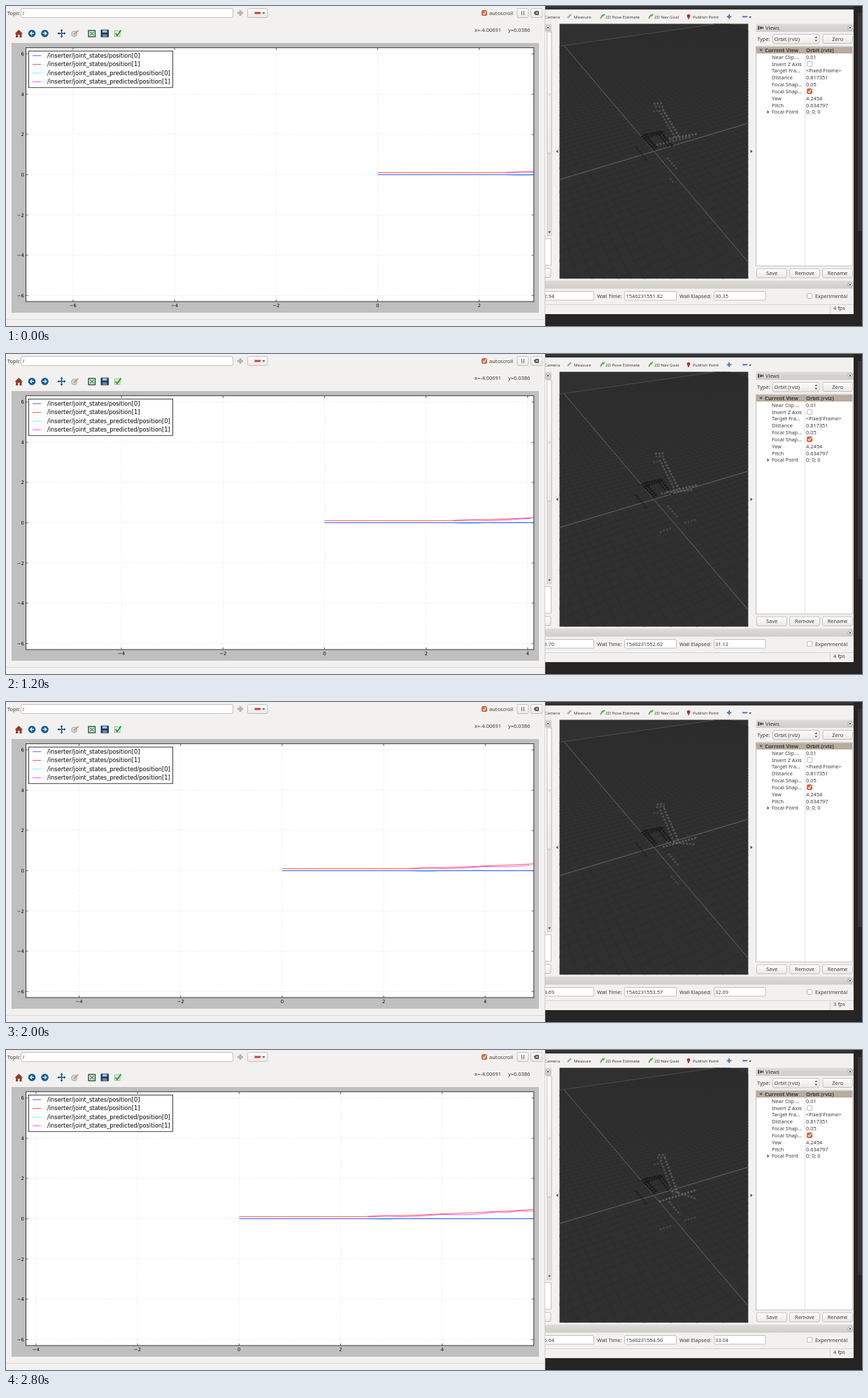
Write an HTML page that moves like this. It is 1224 px wide and 458 px high and loops after 8000 ms.

```html
<!DOCTYPE html>
<html lang="en">
<head>
<meta charset="utf-8">
<title>Joint state plot</title>
<style>
html, body { margin: 0; width: 100%; height: 100%; overflow: hidden; background: #262524; }
svg { display: block; width: 1224px; height: 458px; }
text { font: 7.4px "Noto Sans", "Open Sans", sans-serif; fill: #3c3b39; white-space: pre; }
.bold { font-weight: 700; }
.tool { font-size: 6.05px; }
.tick { font: 6.9px "DejaVu Sans", sans-serif; fill: #111; }
.key { font: 8.27px "DejaVu Sans", sans-serif; fill: #000; }
.mid { text-anchor: middle; }
.end { text-anchor: end; }
.btn { fill: url(#btn); stroke: #b9b4af; stroke-width: .8; }
.field { fill: #fff; stroke: #b5b0ab; stroke-width: .8; }
.grid { stroke: #d4d4d4; stroke-width: .8; stroke-dasharray: 1 2.6; }
.mark { stroke: #000; stroke-width: .6; }
.curve { fill: none; stroke-width: .65; }
</style>
</head>
<body>
<svg id="stage" viewBox="0 0 1224 458">
  <defs>
    <linearGradient id="btn" x2="0" y2="1"><stop stop-color="#fdfdfc"/><stop offset="1" stop-color="#ebe9e7"/></linearGradient>
    <linearGradient id="bar" x2="0" y2="1"><stop stop-color="#dedcda"/><stop offset="1" stop-color="#cfccc9"/></linearGradient>
    <linearGradient id="shade"><stop stop-opacity="0"/><stop offset="1" stop-opacity=".16"/></linearGradient>
    <clipPath id="view"><rect x="791.500" y="25.400" width="269.800" height="364.800"/></clipPath>
    <clipPath id="axes"><rect x="29" y="60" width="725" height="363"/></clipPath>
    <clipPath id="late"><rect id="lateBox" x="29" y="60" width="725" height="363"/></clipPath>
  </defs>

  <rect width="1224" height="458" fill="#262524"/>
  <rect x="1218" y="10" width="6" height="312" fill="#373635"/>
  <g id="viewer">
    <rect x="771" width="441" height="441" fill="#f2f1f0"/>
    <rect x="771" width="441" height="5" fill="#34332f"/>
    <path d="M771 427.500H1212M1178.500 428V440" stroke="#d6d3d0"/>
    <rect x="771" y="393" width="441" height="11.500" fill="url(#bar)"/>
    <rect x="771" y="25.500" width="9" height="11" fill="url(#bar)"/>
    <rect x="771" y="37" width="3" height="292" fill="#fff"/>
    <rect x="773.500" y="37" width="6.500" height="292" fill="#e2dfdc" stroke="#c5c0bb" stroke-width=".7"/>
    <rect x="773.500" y="37" width="6.500" height="174" rx="2" class="btn"/>
    <path d="M775.500 125.500h3m-3 2h3" stroke="#aaa" stroke-width=".6"/>
    <path d="M775 322.500h4l-2 2.800z" fill="#555"/>
    <rect x="764" y="333" width="15.500" height="38" class="field"/>
    <rect x="764" y="375.500" width="15" height="13" rx="2" class="btn"/>
    <path d="M789.500 205.500v5l-3-2.500zM1064.500 205.500v5l3-2.500z" fill="#555"/>
    <g clip-path="url(#view)">
      <rect x="791" y="25" width="271" height="366" fill="#303030"/>
      <path id="floor" fill="none" stroke="#2a2a2a" stroke-width=".7"/>
      <path id="edge" stroke="#5c5c5c" stroke-width=".7"/>
      <path id="axisLines" stroke="#808080" stroke-width=".7"/>
      <g stroke="#161616" stroke-dasharray="2.6 1.200" opacity=".85">
        <path d="M909 186L928 207M913 184L931 204" stroke-width="3.200"/>
        <path d="M911 190L941 180M912 185L938 179" stroke-width="3"/>
        <path d="M937 181L953 201M934 184L948 202" stroke-width="2.600"/>
        <path d="M900 201L917 222" stroke-width="3" opacity=".55"/>
      </g>
      <g id="cloud" stroke="#858585" stroke-width="2.800" stroke-dasharray="2.800 1.900"></g>
    </g>
    <path d="M850 18l3-5 1 1 2-2.500M919 18l3-5 1 1 2-2.500" fill="none" stroke="#3fb62b" stroke-width="1.600"/>
    <path d="M803 17l5-5" stroke="#a9a79a" stroke-width="2.400"/>
    <path d="M976 19.500l-2.200-4.500a2.400 2.400 0 1 1 4.400 0z" fill="#b5342a"/>
    <path d="M1034 12v6.500m-3.200-3.200h6.500" stroke="#5876b4" stroke-width="2"/>
    <path d="M1053 15.300h7" stroke="#5876b4" stroke-width="2"/>
    <path d="M1062 15h4l-2 2.500z" fill="#555"/>

    <rect x="1072.500" y="25.500" width="139.500" height="11.500" fill="url(#bar)"/>
    <path d="M1075 28.500h2.200v5.500h-2.200zM1078 29.500h3v3.500h-3zM1081 31l2-2v4.500z" fill="#555"/>
    <rect x="1096.500" y="40.500" width="66.500" height="13.500" rx="2" class="btn"/>
    <path d="M1156.500 46l1.800-2.500 1.800 2.500zM1156.500 48.500l1.800 2.500 1.800-2.500z" fill="#555"/>
    <rect x="1072.500" y="58" width="138" height="314" class="field"/>
    <rect x="1073" y="58.500" width="137" height="9.500" fill="#b9ab9e"/>
    <path d="M1142.500 68V372" stroke="#dedbd8" stroke-width=".8"/>
    <path d="M1077 61.800h5l-2.500 3.200zM1088.500 149.300v5l3-2.500z" fill="#555"/>
    <rect x="764" y="408.500" width="76.500" height="12.500" rx="1.500" class="field"/>
    <rect x="884.500" y="408.500" width="74" height="12.500" rx="1.500" class="field"/>
    <rect x="1012.500" y="408.500" width="73.500" height="12.500" rx="1.500" class="field"/>
    <text id="ros" class="end" x="784" y="417.700"></text>
    <text id="wall" x="886.500" y="417.700"></text>
    <text id="elapsed" x="1014" y="417.700"></text>
    <text id="fps" x="1183" y="434.700"></text>
  </g>

  <g id="plotter">
    <rect x="764" width="7" height="458" fill="url(#shade)"/>
    <rect width="771" height="458" fill="#f2f1f0"/>
    <path d="M0 448.500H771" stroke="#dddad7"/>
    <path d="M770.700 0V458" stroke="#b8b5b1" stroke-width=".6"/>
    <rect x="21.500" y="3.500" width="303" height="13" rx="2" class="field"/>
    <path d="M335 6v8m-4-4h8" stroke="#b4b2af" stroke-width="2.800"/>
    <rect x="345.500" y="3.500" width="28.500" height="13" rx="2" class="btn"/>
    <path d="M355.500 10h8.500" stroke="#cf4036" stroke-width="3"/>
    <path d="M366.500 9h4l-2 2.700z" fill="#555"/>
    <rect x="731" y="3.500" width="16" height="13" rx="2" class="btn"/>
    <rect x="750.500" y="3.500" width="16.500" height="13" rx="2" class="btn"/>
    <path d="M737.500 7v6M740.500 7v6" stroke="#777" stroke-width="1.200"/>
    <path d="M754.500 10l2.500-3h5v6h-5z" fill="#555"/>
    <path d="M757.700 8.500l3 3m0-3l-3 3" stroke="#fff" stroke-width=".8"/>

    <path d="M12.500 39.500l5.800-5.500 5.800 5.500h-1.600v5.500h-8.400v-5.500z" fill="#8f3a2c"/>
    <path d="M17 41h2.600v4h-2.600z" fill="#f1d7c4"/>
    <g fill="#145e93"><circle cx="37" cy="39.200" r="5.300"/><circle cx="55.500" cy="39.200" r="5.300"/></g>
    <path d="M40 39.200h-5m2.200-2.400l-2.500 2.400 2.500 2.400M52.500 39.200h5m-2.200-2.400l2.500 2.400-2.500 2.400" fill="none" stroke="#fff" stroke-width="1.200"/>
    <path d="M79.500 34.500v9.500m-4.800-4.800h9.600" stroke="#174f7c" stroke-width="1.400"/>
    <path d="M79.500 33l2 2.500h-4zM79.500 45.500l2-2.500h-4zM73.500 39.200l2.500-2v4zM85.500 39.200l-2.500-2v4z" fill="#174f7c"/>
    <circle cx="97.500" cy="40" r="4" fill="#c9dcea" stroke="#8fa9bc"/>
    <path d="M97 41l6-6" stroke="#d99a45" stroke-width="2"/>
    <rect x="118" y="35" width="9.500" height="9" fill="#dfeee0" stroke="#26483b" stroke-width="1.300"/>
    <path d="M120 42l5.500-5M120 37l5.500 5" stroke="#3a9e40" stroke-width="1.300"/>
    <rect x="135.500" y="33.800" width="11.500" height="11" rx="1" fill="#1d3f60"/>
    <path d="M138 34.500h6.500v3.500h-6.500z" fill="#a9c3d6"/><path d="M138 40.500h6.500v4h-6.500z" fill="#6d8ba3"/>
    <rect x="155.500" y="35.500" width="7.500" height="8" fill="#eef5ea" stroke="#86a77c" stroke-width=".8"/>
    <path d="M156.500 39l2.500 3.200 5.500-7.500" fill="none" stroke="#23a51d" stroke-width="2"/>

    <rect x="8" y="53" width="754" height="386" fill="#bfbfbf"/>
    <rect x="28.600" y="59.800" width="726.200" height="363.200" fill="#fff"/>
    <g id="ticks"></g>
    <g clip-path="url(#late)"><g id="predicted"></g></g>
    <g clip-path="url(#axes)"><g id="measured"></g></g>
    <rect x="28.600" y="59.800" width="726.200" height="363.200" fill="none" stroke="#000" stroke-width=".75"/>
    <rect x="32.500" y="64.500" width="206" height="52.300" fill="#fff" stroke="#000" stroke-width=".75"/>
    <g id="legend"></g>
  </g>
</svg>
<script>
const NS = "http://www.w3.org/2000/svg";
const $ = id => document.getElementById(id);
const lerp = (a, b, k) => a + (b - a) * k;

function add(parent, tag, attrs, content) {
  const el = document.createElementNS(NS, tag);
  for (const name in attrs) el.setAttribute(name, attrs[name]);
  if (content !== undefined) el.textContent = content;
  return parent.appendChild(el);
}
const label = (parent, x, y, str, cls = "") => add(parent, "text", { x, y, class: cls }, str);

const viewer = $("viewer"), plotter = $("plotter");

function closeBox(x, y) {
  add(viewer, "rect", { x: x - 3, y: y - 3, width: 6, height: 6, rx: 1, fill: "#efedeb", stroke: "#999", "stroke-width": .6 });
  add(viewer, "path", { d: `M${x - 1.5} ${y - 1.5}l3 3m0-3l-3 3`, stroke: "#444", "stroke-width": .9 });
}
function checkBox(parent, x, y, on) {
  add(parent, "rect", { x: x - 3.5, y: y - 3.5, width: 7, height: 7, rx: 1.2,
    fill: on ? "#e2693f" : "#fff", stroke: on ? "#a9522f" : "#aaa5a0", "stroke-width": .8 });
  if (on) add(parent, "path", { d: `M${x - 2} ${y}l1.600 2 3-4.500`, fill: "none", stroke: "#fff", "stroke-width": 1.2 });
}
function button(x, y, w, str) {
  add(viewer, "rect", { x, y, width: w, height: 13, rx: 2, class: "btn" });
  label(viewer, x + w / 2, y + 9.2, str, "mid");
}

// Viewer chrome
[[770, "Camera"], [812, "Measure"], [857, "2D Pose Estimate"], [927, "2D Nav Goal"], [982, "Publish Point"]]
  .forEach(([x, s]) => label(viewer, x, 17.5, s, "tool"));
[[775, 31], [1207, 31], [1207, 399]].forEach(p => closeBox(...p));
label(viewer, 1086, 33.7, "Views");
label(viewer, 1074, 49.7, "Type:");
label(viewer, 1098.5, 49.7, "Orbit (rviz)");
button(1168, 40.5, 42.5, "Zero");
["Save", "Remove", "Rename"].forEach((s, i) => button(1073.5 + 47 * i, 376, 43, s));
label(viewer, 1085, 65.8, "Current View", "bold");
label(viewer, 1144, 65.8, "Orbit (rviz)", "bold");
[["Near Clip …", "0.01"], ["Invert Z Axis", ""], ["Target Fra…", "<Fixed Frame>"], ["Distance", "0.817351"],
 ["Focal Shap…", "0.05"], ["Focal Shap…", ""], ["Yaw", "4.2454"], ["Pitch", "0.634797"], ["Focal Point", "0; 0; 0"]]
  .forEach(([name, value], i) => {
    label(viewer, 1095, 75.7 + 9.83 * i, name);
    label(viewer, 1144, 75.7 + 9.83 * i, value);
  });
checkBox(viewer, 1149, 83, false);
checkBox(viewer, 1149, 122, true);
checkBox(viewer, 1149, 415, false);
label(viewer, 845, 417.7, "Wall Time:");
label(viewer, 963, 417.7, "Wall Elapsed:");
label(viewer, 1157, 417.7, "Experimental");

// Plot window chrome
label(plotter, 2, 12.7, "Topic");
label(plotter, 23.5, 12.7, "/");
checkBox(plotter, 684, 10, true);
label(plotter, 691, 12.7, "autoscroll");
label(plotter, 670, 37.2, "x=-4.00691");
label(plotter, 718, 37.2, "y=6.0386");

// Orbit camera looking at the origin; the floor is 2 m wide
const YAW = 4.2454, PITCH = .634797, DIST = .817351;
const FOCAL = 182 / Math.tan(Math.PI / 8);
function project(x, y) {
  const ahead = -x * Math.cos(YAW) - y * Math.sin(YAW);
  const right = y * Math.cos(YAW) - x * Math.sin(YAW);
  const k = FOCAL / (DIST + ahead * Math.cos(PITCH));
  return (926.5 + right * k).toFixed(1) + " " + (208 - ahead * Math.sin(PITCH) * k).toFixed(1);
}
const CELL = .02, NEAR = -.5;
const alongX = y => `M${project(-1, y)}L${project(1, y)}`;
const alongY = x => `M${project(x, NEAR)}L${project(x, 1)}`;
let floor = "";
for (let i = -50; i <= 50; i++) {
  floor += alongY(i * CELL);
  if (i * CELL >= NEAR) floor += alongX(i * CELL);
}
$("floor").setAttribute("d", floor);
$("edge").setAttribute("d", alongX(1));
$("axisLines").setAttribute("d", alongX(0) + alongY(0));

// Rows of voxels: start line, end line, opacity
const rows = [
  [[926, 140, 939, 139], [933, 150, 943, 150], .42],
  [[928, 144, 940, 144], [931, 154, 944, 153], .34],
  [[925, 151, 934, 150], [926, 164, 936, 162], .26],
  [[934, 149, 957, 189], [936, 157, 954, 207], .38],
  [[939, 148, 963, 188], [942, 154, 961, 206], .46],
  [[948, 190, 988, 183], [934, 217, 988, 200], .5],
  [[930, 199, 980, 187], [952, 201, 987, 213], .42],
  [[945, 217, 960, 234], [948, 217, 964, 236], .34]
].map(([from, to, opacity]) => ({ from, to, el: add($("cloud"), "path", { opacity }) }));
const trail = add($("cloud"), "path", { opacity: .25 });

// Plot
const UNIT = 72.6, YUNIT = 28.8, ZERO = 241.5;
const yPix = v => ZERO - v * YUNIT;
const ticks = [];
const minus = n => String(n).replace("-", "−");
for (let n = -6; n <= 6; n += 2) {
  const y = yPix(n);
  add($("ticks"), "path", { d: `M28.500 ${y}H754`, class: "grid" });
  add($("ticks"), "path", { d: `M28.500 ${y}h3M754.500 ${y}h-3`, class: "mark" });
  label($("ticks"), 26, y + 2.4, minus(n), "tick end");
  const g = add($("ticks"), "g", {});
  add(g, "path", { d: "M0 60V423", class: "grid" });
  add(g, "path", { d: "M0 60v3M0 423v-3", class: "mark" });
  label(g, 0, 430.6, minus(n), "tick mid");
  ticks.push({ n, g });
}

function curve(parent, color, pts) {
  const points = pts.map(([x, y]) => `${x * UNIT},${yPix(y)}`).join(" ");
  add(parent, "polyline", { points, stroke: color, class: "curve" });
}
curve($("predicted"), "#0ff", [[2.53, 0], [2.7, -.03], [2.95, -.04], [3.1, 0], [3.65, 0], [3.85, .03], [4.05, 0], [5.9, 0]]);
curve($("predicted"), "#f0f", [[2.53, .1], [2.85, .14], [3, .135], [3.25, .1], [3.45, .12], [3.7, .16], [3.98, .21], [4.25, .2],
  [4.5, .2], [4.78, .25], [5.06, .34], [5.26, .31], [5.54, .4], [5.7, .37], [5.9, .38]]);
curve($("measured"), "#00f", [[0, 0], [5.9, 0]]);
curve($("measured"), "#f00", [[0, .1], [2.3, .1], [3.07, .15], [3.6, .19], [4.12, .25], [4.6, .3], [5.2, .37], [5.81, .46], [5.9, .47]]);

["#00f", "#f00", "#0ff", "#f0f"].forEach((stroke, i) => {
  const y = 71 + 12.5 * i;
  add($("legend"), "path", { d: `M38 ${y}H50`, stroke, class: "curve" });
  label($("legend"), 59, y + 2.8, `/inserter/joint_states${i > 1 ? "_predicted" : ""}/position[${i % 2}]`, "key");
});

// time, plot origin, seconds elapsed, wall clock, ROS clock, end of prediction
const keys = [
  [0, 531.5, 30.35, 51.82, 92.94, 755],
  [600, 493, 30.91, 52.35, 93.49, 750],
  [1000, 474.5, 31.05, 52.53, 93.63, 752],
  [1200, 455.5, 31.12, 52.62, 93.70, 750],
  [1700, 421.7, 31.66, 53.18, 94.25, 753],
  [2200, 377, 32.38, 53.83, 94.98, 746],
  [2600, 358, 32.59, 54.05, 95.18, 742],
  [2800, 333.3, 33.04, 54.50, 95.64, 755]
];
const LOOP = 8000;
const steps = [0, 600, 1000];
for (let t = 1200; t <= 2800; t += 100) if (t !== 2300) steps.push(t);

function sample(t) {
  const i = keys.findIndex(k => k[0] >= t);
  if (i < 1) return keys[0];
  const a = keys[i - 1], b = keys[i], k = (t - a[0]) / (b[0] - a[0]);
  return a.map((v, j) => lerp(v, b[j], k));
}

function show(t) {
  const [, x0, elapsed, wall, ros, late] = sample(t);
  for (const { n, g } of ticks) {
    const x = x0 + n * UNIT;
    g.setAttribute("transform", `translate(${x})`);
    g.style.display = x >= 29 && x <= 754 ? "" : "none";
  }
  for (const id of ["predicted", "measured"]) $(id).setAttribute("transform", `translate(${x0})`);
  $("lateBox").setAttribute("width", late - 29);

  $("ros").textContent = ros.toFixed(2);
  $("wall").textContent = (1546231500 + wall).toFixed(2);
  $("elapsed").textContent = elapsed.toFixed(2);
  $("fps").textContent = (t >= 2000 && t < 2800 ? 3 : 4) + " fps";

  const p = (elapsed - 30.35) / 2.69;
  for (const { from, to, el } of rows) {
    const [x1, y1, x2, y2] = from.map((v, i) => lerp(v, to[i], p));
    el.setAttribute("d", `M${x1} ${y1}L${x2} ${y2}`);
  }
  const across = t >= 600 && t < 1500 || t >= 2800;
  const dy = 3 * p;
  trail.setAttribute("d", across
    ? `M935 ${254 + dy}L953 ${248 + dy}M970 ${241 + dy}L987 ${236 + dy}`
    : `M${949 + dy} ${247 + dy}L${956 + 8 * p} ${254 + 11 * p}`);
}

const start = performance.now();
let last = -1;
function frame() {
  const t = (performance.now() - start) % LOOP;
  const step = steps.filter(s => s <= t).pop() || 0;
  if (step !== last) show(last = step);
  requestAnimationFrame(frame);
}
frame();
</script>
</body>
</html>
```
